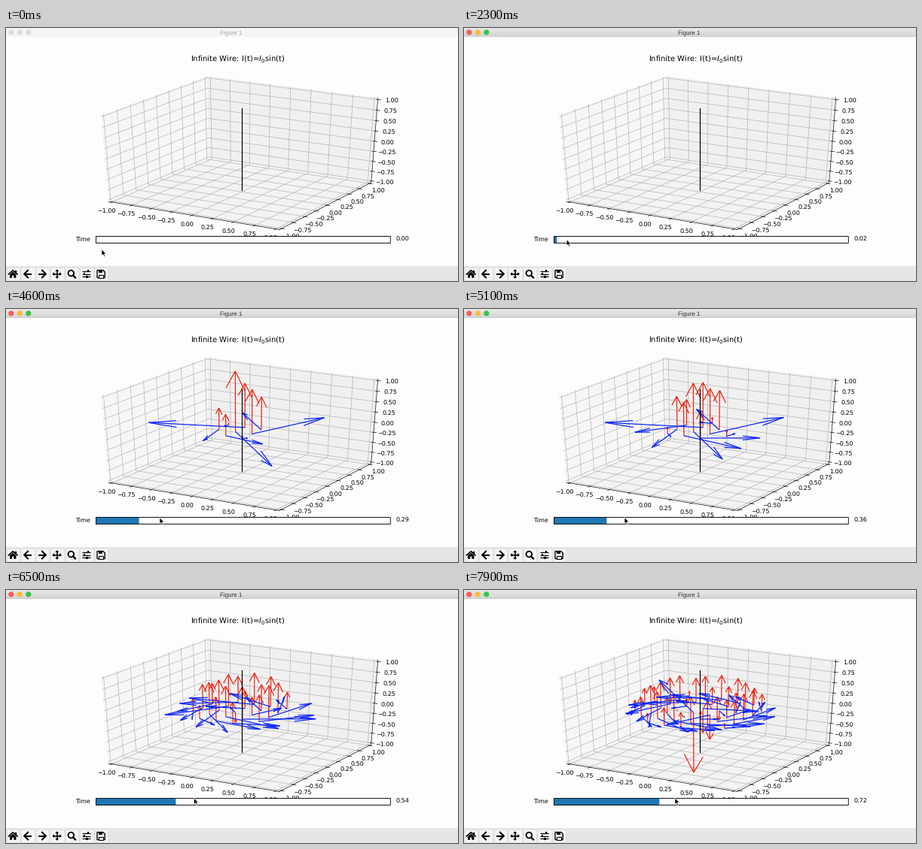
Recreate the animation shown at these times as a matplotlib script. Size 600x337 px, loop 8000 ms.

```python
import numpy as np
import matplotlib.pyplot as plt
from matplotlib.animation import FuncAnimation
from matplotlib.collections import LineCollection
from matplotlib.patches import Circle, Polygon, Rectangle

W, H = 600, 337
STEP = 100            # ms per frame
PT = 0.586            # window points to drawing points
BG = "#fdfcfe"

plt.rcParams.update({"font.family": "DejaVu Sans", "text.hinting": "none",
                     "text.hinting_factor": 1})
fig = plt.figure(figsize=(W / 100, H / 100), dpi=100, facecolor=BG)
ax = fig.add_axes([0, 0, 1, 1])


def rect(x0, y0, x1, y1, **kw):
    return ax.add_patch(Rectangle((x0, y0), x1 - x0, y1 - y0, **kw))


def poly(points, color="black", **kw):
    return ax.add_patch(Polygon(points, closed=True, facecolor=color, **kw))


def line(xs, ys, lw=1.4, color="black", **kw):
    return ax.plot(xs, ys, color=color, lw=lw, **kw)[0]


# ---- perspective view: elevation 30, azimuth -60, distance 10 ----
el, az = np.radians(30), np.radians(-60)
RIGHT = np.array([-np.sin(az), np.cos(az), 0])
UP = np.array([-np.cos(az) * np.sin(el), -np.sin(az) * np.sin(el), np.cos(el)])
EYE = np.array([np.cos(az) * np.cos(el), np.sin(az) * np.cos(el), np.sin(el)])


def project(p):
    u = np.asarray(p, float) / 2
    depth = 10 - u @ EYE
    return np.stack([313.2 + 2513.5 * (u @ RIGHT) / depth,
                     162.7 - 1265 * (u @ UP) / depth], axis=-1)


M = 1 + 1 / 24                       # padded half size of the box
SIDE = np.array([-M, M, -M])         # visible back panes
TICKS = np.linspace(-1, 1, 9)


def draw_box():
    for i, shade in enumerate((0.95, 0.90, 0.925)):
        j, k = [n for n in range(3) if n != i]
        corners = np.tile(SIDE, (4, 1))
        corners[:, j] = [-M, M, M, -M]
        corners[:, k] = [-M, -M, M, M]
        poly(project(corners), str(shade), alpha=0.5, lw=0, zorder=1)

    grid = []
    for i in range(3):
        j, k = [n for n in range(3) if n != i]
        for t in TICKS:
            path = np.tile(SIDE, (3, 1))
            path[:, i] = t
            path[0, j] *= -1
            path[2, k] *= -1
            grid.append(project(path))
    ax.add_collection(LineCollection(grid, colors="#b0b0b0",
                                     linewidths=0.8 * PT, zorder=2))

    edges = [(0, -M, -M), (M, 0, -M), (M, M, 0)]
    for i, (edge, d) in enumerate(zip(edges, (1, 0, 0))):
        edge = np.array(edge)
        out = np.sign(edge)
        ends = np.tile(edge, (2, 1))
        ends[:, i] = -M, M
        line(*project(ends).T, lw=0.8 * PT, zorder=3)
        for t in TICKS:
            at = edge.copy()
            at[i] = t
            tick = np.tile(at, (2, 1))
            tick[:, d] += out[d] * np.array([-1 / 60, 1 / 30])
            line(*project(tick).T, lw=0.8 * PT, zorder=3)
            x, y = project(at + 0.107 * out)
            ax.text(x, y, f"{t:.2f}".replace("-", "\u2212"), ha="center",
                    va="top", fontsize=10 * PT, zorder=4)


def draw_toolbar():
    rect(0, 317, W, H, color="#e6e5e7", lw=0, zorder=1)
    for n in range(7):
        x = 0.6 + 19.5 * n
        rect(x, 318.6, x + 17.8, 336.4, facecolor="#f5f5f5",
             edgecolor="#d8d8d8", lw=0.4, zorder=2)
    z = dict(zorder=3)
    # home
    line([3.4, 9.2, 15], [328, 322.8, 328], 1.2, **z)
    poly([(5, 328.4), (9.2, 324.6), (13.4, 328.4), (13.4, 332.8), (10.3, 332.8),
          (10.3, 329.6), (8.1, 329.6), (8.1, 332.8), (5, 332.8)], **z)
    rect(12, 322.8, 13.4, 326, color="black", **z)
    # back and forward
    for tip, s in ((23.6, 1), (53.4, -1)):
        line([tip + s, tip + 10.6 * s], [327.6] * 2, 1.5,
             solid_capstyle="butt", **z)
        line([tip + 5.4 * s, tip + 0.6 * s, tip + 5.4 * s],
             [322.8, 327.6, 332.4], 1.5, solid_joinstyle="miter", **z)
    # pan
    cx, cy = 67.7, 327.6
    line([cx - 4.5, cx + 4.5], [cy, cy], 1.2, **z)
    line([cx, cx], [cy - 4.5, cy + 4.5], 1.2, **z)
    for dx, dy in ((1, 0), (-1, 0), (0, 1), (0, -1)):
        poly([(cx + 6.2 * dx, cy + 6.2 * dy),
              (cx + 3.6 * dx + 2.5 * dy, cy + 3.6 * dy + 2.5 * dx),
              (cx + 3.6 * dx - 2.5 * dy, cy + 3.6 * dy - 2.5 * dx)], **z)
    # zoom
    ax.add_patch(Circle((86.3, 326.6), 3.8, fill=False, ec="black", lw=1.3, **z))
    line([89.2, 92], [329.6, 332.4], 1.7, **z)
    # subplot sliders
    for y, knob in ((323.8, 108.8), (327.6, 104), (331.4, 107.4)):
        line([101.2, 112.4], [y, y], 0.9, solid_capstyle="butt", **z)
        rect(knob - 1.1, y - 1.5, knob + 1.1, y + 1.5, color="black", lw=0, **z)
    # save
    poly([(121, 322.6), (128.8, 322.6), (131.2, 325), (131.2, 332.6),
          (121, 332.6)], "#f5f5f5", edgecolor="black", lw=1, **z)
    rect(122.8, 322.6, 127.8, 325.8, color="black", lw=0, **z)
    rect(123, 328.6, 129.2, 332.6, facecolor="#f5f5f5", edgecolor="black",
         lw=0.8, **z)


# ---- window ----
BAR_H = 12
shade = np.linspace(0.91, 0.82, BAR_H)[:, None]
ax.imshow(shade, cmap="gray", vmin=0, vmax=1, extent=(0, W, BAR_H, 0),
          aspect="auto", zorder=1)
inactive_bar = rect(0, 0, W, BAR_H, color="#f6f5f6", lw=0, zorder=2)
LIGHTS = "#fb5c55", "#fcbc35", "#34c74a"
lights = [ax.add_patch(Circle((x, 5.8), 3.6, lw=0, zorder=3))
          for x in (6.8, 18.2, 29.8)]
caption = ax.text(299, 6, "Figure 1", family="Liberation Sans",
                  fontsize=5.7, ha="center", va="center_baseline", zorder=3)
draw_toolbar()

# ---- plot ----
draw_box()
ax.text(307.3, 44.4, "Infinite Wire: I(t)=$I_0$sin(t)", ha="center",
        va="baseline", fontsize=12 * PT, zorder=4)
line(*project([(0, 0, -1), (0, 0, 1)]).T, lw=1.5 * PT,
     solid_capstyle="projecting", zorder=7)
red = LineCollection([], colors="#ea2410", linewidths=1.5 * PT, zorder=5)
blue = LineCollection([], colors="#0a24f4", linewidths=1.5 * PT, zorder=6)
ax.add_collection(red)
ax.add_collection(blue)

# ---- slider ----
SX0, SX1, SY0, SY1 = 119.5, 510.3, 277.5, 286.5
rect(SX0, SY0, SX1, SY1, color=BG, lw=0, zorder=8)
bar = rect(SX0, SY0, SX0, SY1, color="#1f77b4", lw=0, snap=False, zorder=9)
rect(SX0, SY0, SX1, SY1, fill=False, ec="black", lw=0.65, snap=False, zorder=10)
ax.text(111.9, 282, "Time", ha="right", va="center", fontsize=10 * PT, zorder=9)
readout = ax.text(517.8, 282, "", ha="left", va="center", fontsize=10 * PT,
                  zorder=9)

POINTER = np.array([(0, 0), (0, 8.4), (1.9, 6.7), (3.2, 9.6), (4.5, 9.1),
                    (3.2, 6.2), (5.8, 6.1)])
pointer = poly(POINTER, edgecolor="white", lw=0.4, zorder=12)

ax.set_xlim(0, W)
ax.set_ylim(H, 0)
ax.axis("off")

# ---- retarded field around the wire ----
OMEGA, GAIN = 4.75, 0.965
axis_pts = -0.85 + 0.2 * np.arange(10)
GX, GY = (g.ravel() for g in np.meshgrid(axis_pts, axis_pts))
GR = np.hypot(GX, GY)
BARB = np.radians(15)


def field(r, t):
    """Integral of cos(w(t - R)) / R along the part of the wire in reach."""
    reach = np.arccosh(t / r)
    theta = reach[:, None] * (np.arange(48) + 0.5) / 48
    wave = np.cos(OMEGA * (t - r[:, None] * np.cosh(theta)))
    return GAIN * reach * wave.mean(axis=1)


def arrows(base, vec, side):
    tip = base + vec
    size = np.linalg.norm(vec, axis=1, keepdims=True)
    segs = [np.stack([base, tip], axis=1)]
    for s in (1, -1):
        back = vec * np.cos(BARB) + s * size * np.sin(BARB) * np.array(side)
        segs.append(np.stack([tip, tip - 0.3 * back], axis=1))
    return project(np.concatenate(segs))


def set_fields(t):
    on = GR < t
    if not on.any():
        red.set_segments([])
        blue.set_segments([])
        return
    x, y, r = GX[on], GY[on], GR[on]
    amp, zero = field(r, t), np.zeros(on.sum())
    base = np.column_stack([x, y, zero])
    red.set_segments(arrows(base, np.column_stack([zero, zero, amp]), (1, 0, 0)))
    swirl = np.column_stack([-y * amp / r, x * amp / r, zero])
    blue.set_segments(arrows(base, swirl, (0, 0, 1)))


# ---- timing in ms ----
MOVE_T = 0, 400, 800, 1900, 2300, 4600, 5800, 6500, 7300, 7900
MOVE_X = 127, 126.5, 124, 124.5, 136.2, 204, 225.8, 249.5, 269.3, 280
MOVE_Y = 294.8, 291, 281.4, 281.6, 281.6, 277.8, 277.2, 277, 277, 277
VALUE_T = 800, 2400, 4600, 5800, 6500, 7300, 7900
VALUE = 0.02, 0.02, 0.292, 0.45, 0.542, 0.692, 0.716


def update(i):
    ms = i * STEP
    active = ms >= 500
    inactive_bar.set_visible(not active)
    for dot, color in zip(lights, LIGHTS):
        dot.set_facecolor(color if active else "#dcdcdc")
    caption.set_color("#303030" if active else "#a4a4a4")

    t = np.interp(ms, VALUE_T, VALUE) if ms >= 800 else 0
    bar.set_width((SX1 - SX0) * t / 2)
    readout.set_text(f"{t:.2f}")
    set_fields(t)

    at = np.interp(ms, MOVE_T, MOVE_X), np.interp(ms, MOVE_T, MOVE_Y)
    pointer.set_xy(POINTER + at)
    return []


anim = FuncAnimation(fig, update, frames=80, interval=STEP, repeat=True)
plt.show()
```
